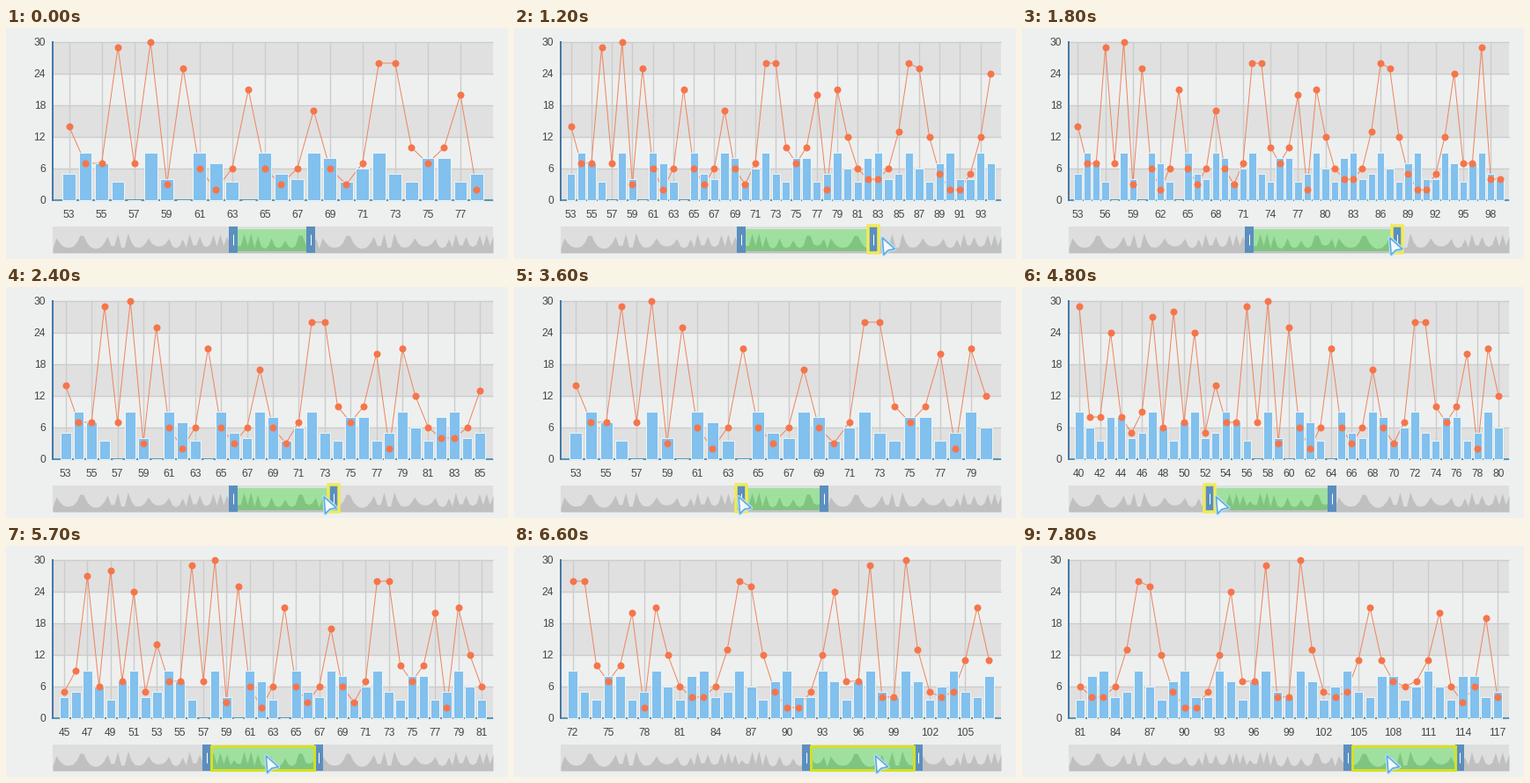
Animation of 570x263 px, one loop 8000 ms. Source, as a matplotlib script:

```python
import math

import matplotlib.pyplot as plt
import numpy as np
from matplotlib.animation import FuncAnimation
from matplotlib.patches import Polygon, Rectangle

WIDTH, HEIGHT, DPI = 570, 263, 100
PX = 72 / DPI
LEFT, RIGHT, TOP, BASE = 53, 553, 16, 196
TRACK_TOP, TRACK_BOTTOM = 226, 256
COUNT, PERIOD, FIRST = 130, 78, 40
LEAD = 0.45  # steps by which the pointer runs ahead of what it drags

ORANGE, BLUE, HANDLE = "#f6754a", "#82c0ee", "#5b8fbf"
PAPER, STRIPE, GRID, INK = "#eef0ef", "#e0e0e0", "#cbcccb", "#444444"

# Summits of the line; the valleys between them follow a rule.
PEAKS = {40: 29, 43: 24, 47: 27, 49: 28, 51: 24, 53: 14, 56: 29, 58: 30, 60: 25,
         64: 21, 68: 17, 72: 26, 73: 26, 77: 20, 79: 21, 86: 26, 87: 25, 94: 24,
         97: 29, 100: 30, 106: 21, 112: 20, 116: 19, 118: 29}
EMPTY = (57, 60, 64)

fig = plt.figure(figsize=(WIDTH / DPI, HEIGHT / DPI), dpi=DPI, facecolor=PAPER)
ax = fig.add_axes([0, 0, 1, 1])


def make_line():
    rng = np.random.default_rng(7)
    values = np.zeros(PERIOD + 1)
    peaks = list(PEAKS.items())
    for (a, high_a), (b, high_b) in zip(peaks, peaks[1:]):
        floor = rng.integers(2, 8)
        u = np.linspace(0, 1, b - a + 1)
        ridge = high_a + (high_b - high_a) * u
        dip = floor + (ridge - floor) * np.abs(2 * u - 1) ** 2.5
        values[a - FIRST:b - FIRST + 1] = np.round(dip)
    return values[(np.arange(COUNT) - FIRST) % PERIOD]


def make_bars():
    cats = np.arange(COUNT)
    wave = 6.2 + 3.1 * np.cos(math.tau * (cats - FIRST) / 3.55)
    bars = np.maximum(3.5, np.round(wave))
    bars[list(EMPTY)] = 0
    return bars


line_values, bar_values = make_line(), make_bars()


def ease(t, *keys):
    """Move through (time, value) keys with a cosine ease on every leg."""
    for (t0, v0), (t1, v1) in zip(keys, keys[1:]):
        if t <= t1:
            u = max(0, (t - t0) / (t1 - t0))
            return v0 + (v1 - v0) * (1 - math.cos(math.pi * u)) / 2
    return keys[-1][1]


def handles(t):
    slide = ease(t, (18.5, 0), (24.5, 170), (30.5, 0))
    x0 = ease(t, (12, 258), (15.1, 202), (17, 225))
    x1 = ease(t, (1, 346), (5.5, 429), (9.3, 352))
    return x0 + slide, x1 + slide


def active_part(step):
    if 1 <= step < 10:
        return "right"
    if 12 <= step < 18:
        return "left"
    return "range" if step >= 18 else None


def pointer_x(step):
    x0, x1 = handles(step + LEAD)
    grabbed = {"left": x0, "right": x1, "range": x0 + 60}
    travel = ease(step, (10, 352), (12, 258))
    return grabbed.get(active_part(step), travel)


def visible_range(x0, x1):
    start = np.interp(x0, [200, 258, 370, 400], [36.7, 53.4, 81, 88.5])
    return round(float(start)), round(80 + (x1 - 352) / 3.946)


def value_y(value):
    return BASE - 6 * value


def box(x0, y0, x1, y1, color, z, edge="none", width=0):
    patch = Rectangle((x0, y0), x1 - x0, y1 - y0, facecolor=color,
                      edgecolor=edge, linewidth=width * PX, zorder=z)
    return ax.add_patch(patch)


def stroke(xs, ys, color, width, z):
    ax.plot(xs, ys, color=color, lw=width * PX, zorder=z, solid_capstyle="butt")


def label(x, y, value, align):
    ax.text(x, y, str(value), family="Liberation Sans", size=12 * PX, color=INK,
            ha=align, va="center_baseline")


def draw_chart(start, end):
    cats = np.arange(start, end + 1)
    gap = (RIGHT - LEFT) / (len(cats) + 1)
    xs = LEFT + gap * np.arange(1, len(cats) + 1)

    for value in range(0, 31, 6):
        y = value_y(value)
        if value % 12 == 0 and value < 30:
            box(LEFT, y - 36, RIGHT, y, STRIPE, 1)
        stroke([LEFT, RIGHT], [y, y], GRID, 1.4, 2)
        label(45, y, value, "right")

    every = math.ceil((22 if end < 100 else 29) / gap)
    for x, cat in zip(xs[::every], cats[::every]):
        stroke([x, x], [TOP, BASE], GRID, 1.4, 2)
        label(x, 212, cat, "center")

    ys = value_y(line_values[cats])
    stroke(xs, ys, "#ee8560", 1, 3)
    stroke([LEFT, RIGHT], [BASE, BASE], "#4a8fb0", 1.8, 4)
    stroke([LEFT, LEFT], [TOP - 1, BASE + 1], "#4479a8", 2, 4)
    for x, value in zip(xs, bar_values[cats]):
        box(x - 0.4 * gap, value_y(value), x + 0.4 * gap, BASE, BLUE, 5,
            "#e8f5f6", 1)
    ax.plot(xs, ys, "o", ms=8 * PX, color=ORANGE, mew=0, zorder=6)


def draw_slider(x0, x1, active):
    xs = LEFT + (RIGHT - LEFT) * np.arange(COUNT) / (COUNT - 1)
    ys = TRACK_BOTTOM - 4 - 0.62 * line_values
    box(LEFT, TRACK_TOP, RIGHT, TRACK_BOTTOM, "#dedede", 1)
    ax.fill_between(xs, ys, TRACK_BOTTOM, color="#c0c0c0", lw=0, zorder=2)
    chosen = box(x0, TRACK_TOP + 3, x1, TRACK_BOTTOM - 3, "#9fe09f", 3)
    area = ax.fill_between(xs, ys, TRACK_BOTTOM, color="#7fc57f", lw=0, zorder=4)
    area.set_clip_path(chosen)

    for x in (x0, x1):
        box(x - 5, TRACK_TOP, x + 5, TRACK_BOTTOM, HANDLE, 5)
        stroke([x, x], [235, 247], "white", 1, 6)
    if active == "range":
        box(x0 + 5, TRACK_TOP + 1.5, x1 - 5, TRACK_BOTTOM - 1.5, "none", 7,
            "#d5e024", 3)
    elif active:
        x = x0 if active == "left" else x1
        box(x - 6, TRACK_TOP - 1, x + 6, TRACK_BOTTOM, "none", 7, "#f1ea58", 3.5)


def draw_pointer(x, y=239):
    shape = np.array([(0, 0), (1.5, 19), (6.5, 14), (14, 12.5)]) + (x, y)
    for color, width in (("#b9e2f8", 4), ("#5fa9dc", 1.6)):
        ax.add_patch(Polygon(shape, facecolor="#f2faff", edgecolor=color,
                             linewidth=width * PX, joinstyle="round", zorder=9))


def draw(frame):
    step = frame // 3
    ax.clear()
    ax.set(xlim=(0, WIDTH), ylim=(HEIGHT, 0))
    ax.axis("off")
    x0, x1 = handles(step)
    draw_chart(*visible_range(x0, x1))
    draw_slider(x0, x1, active_part(step))
    if step:
        draw_pointer(pointer_x(step))
    return []


anim = FuncAnimation(fig, draw, frames=80, interval=100, repeat=True,
                     repeat_delay=0, init_func=lambda: draw(0))
plt.show()
```
